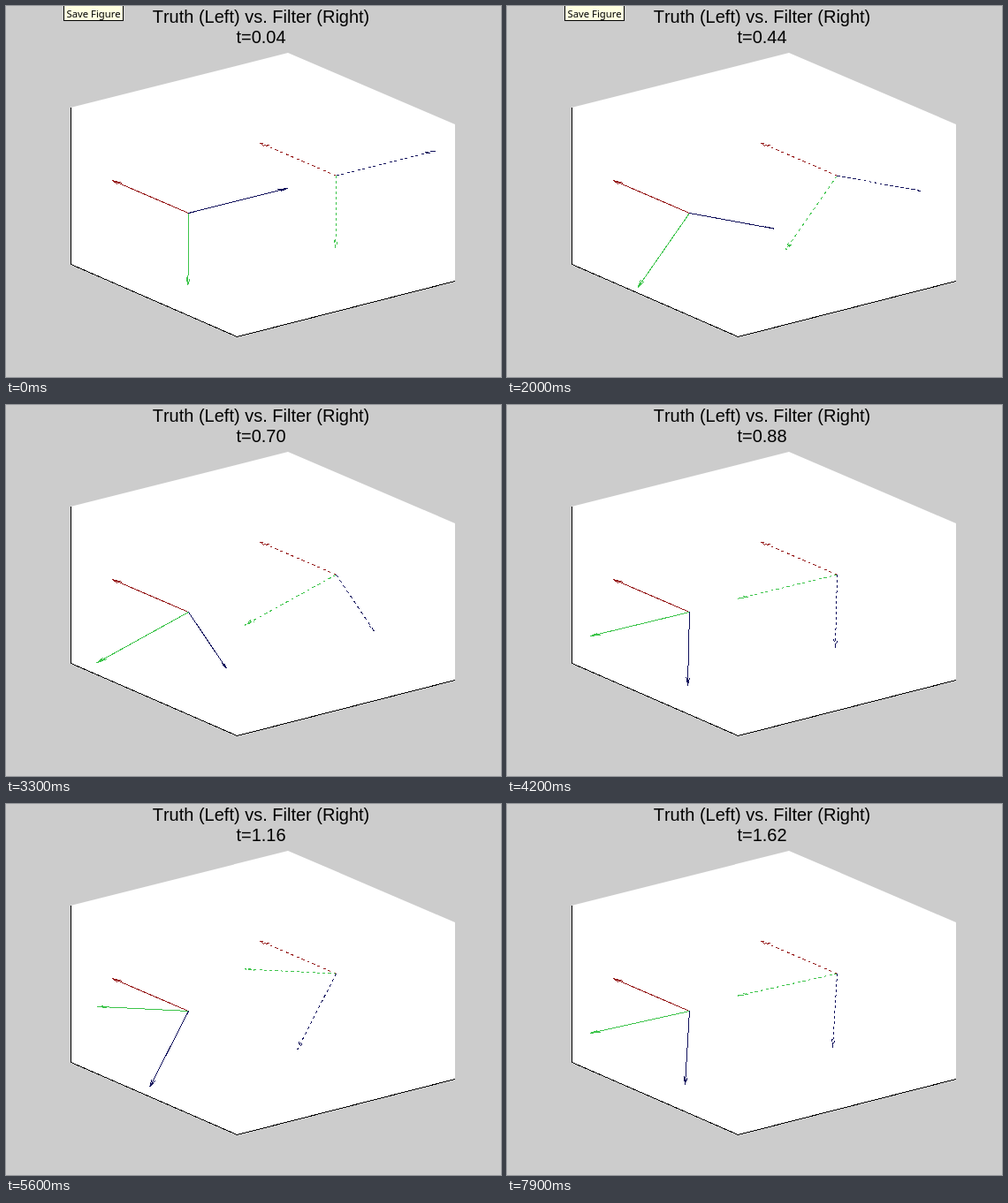
Recreate the animation shown at these times as an HTML page. Size 560x420 px, loop 8000 ms.

```html
<!DOCTYPE html>
<html lang="en">
<head>
<meta charset="utf-8">
<title>Truth vs. Filter</title>
<style>
  html, body { margin: 0; width: 100%; height: 100%; overflow: hidden; background: #ccc; }
  svg { display: block; }
  .title { font: 20px "Liberation Sans", Arial, sans-serif; font-kerning: none; text-anchor: middle; }
  .tip { font: 11.3px "Noto Sans", "Open Sans", sans-serif; }
  .line { fill: none; stroke-width: 1; shape-rendering: crispEdges; }
</style>
</head>
<body>
<svg width="560" height="420" viewBox="0 0 560 420">
  <path d="M73 115L319 53L508 134V311L261 374L73 292Z" fill="#fff"/>
  <path class="line" d="M73.5 115V292.5L261.5 374.5L508 311.5" stroke="#000"/>
  <g id="axes"></g>
  <text class="title" x="288.5" y="19">Truth (Left) vs. Filter (Right)</text>
  <text class="title" x="288.5" y="42" id="clock"></text>
  <g id="tooltip">
    <rect class="line" x="65.5" y="-3.5" width="67" height="20" style="fill:#ffffe1" stroke="#000"/>
    <text class="tip" x="68.5" y="13">Save Figure</text>
  </g>
</svg>
<script>
const LOOP = 8000, STEP = 100, TOOLTIP_END = 2400;
const HEAD = 0.09, SPREAD = 0.25, DOT = 3;

// Screen projections of the three unit vectors
const X = [-86, -37], Y = [112.4, -28.6], DOWN = [0, 81];
const COLORS = ['#961a1a', '#3cc44a', '#10105c'];

const byId = id => document.getElementById(id);
const mix = (a, p, b, q) => [a[0] * p + b[0] * q, a[1] * p + b[1] * q];

function makeFrame(origin, dotted) {
  const paths = COLORS.map(color => {
    const path = document.createElementNS('http://www.w3.org/2000/svg', 'path');
    path.setAttribute('class', 'line');
    path.setAttribute('stroke', color);
    byId('axes').append(path);
    return path;
  });
  return { origin, dotted, paths };
}

const frames = [makeFrame([206.5, 234.5], false), makeFrame([373.5, 192.1], true)];

// The head opens sideways in the horizontal plane
function arrow(origin, v, side) {
  const at = p => mix(origin, 1, p, 1).map(n => n.toFixed(2)).join(' ');
  const barb = s => at(mix(v, 1 - HEAD, side, s * HEAD * SPREAD));
  return `M${at([0, 0])}L${at(v)}M${barb(1)}L${at(v)}L${barb(-1)}`;
}

// Dots are counted in pixels along the longer screen axis
const dotLength = ([x, y]) => DOT * Math.hypot(x, y) / Math.max(Math.abs(x), Math.abs(y));

function draw(ms) {
  const step = Math.floor(ms / STEP);
  const t = 0.04 + 0.02 * step;
  const angle = 1 - Math.cos(2.5 * t);
  const c = Math.cos(angle), s = Math.sin(angle);
  const vectors = [X, mix(DOWN, c, Y, -s), mix(Y, c, DOWN, s)];
  const sides = [Y, X, X];

  for (const { origin, dotted, paths } of frames)
    paths.forEach((path, i) => {
      path.setAttribute('d', arrow(origin, vectors[i], sides[i]));
      if (dotted) path.setAttribute('stroke-dasharray', dotLength(vectors[i]));
    });

  byId('clock').textContent = 't=' + t.toFixed(2);
  byId('tooltip').style.display = ms < TOOLTIP_END ? '' : 'none';
}

const start = performance.now();
function tick() {
  draw((performance.now() - start) % LOOP);
  requestAnimationFrame(tick);
}
tick();
</script>
</body>
</html>
```
